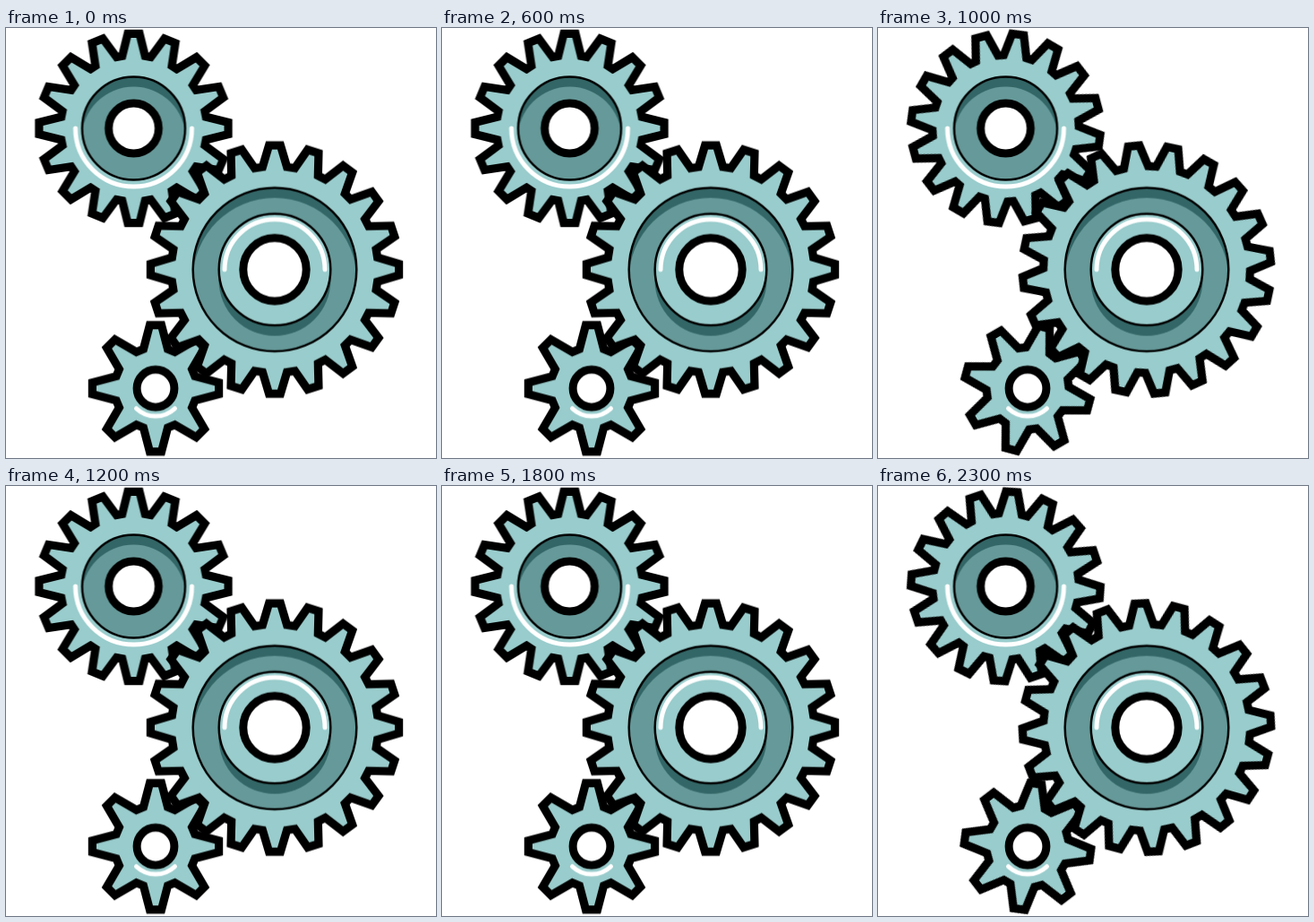
These frames come from a looping animation (480x480 px, 2400 ms). An HTML page:

```html
<!DOCTYPE html>
<html lang="en">
<head>
<meta charset="utf-8">
<title>Gears</title>
<style>
  html, body { margin: 0; width: 100%; height: 100%; overflow: hidden; background: #fff; }
  svg { display: block; width: 100vw; height: 100vh; }
  .teeth {
    fill: #9cc; stroke: #000; stroke-width: 18.4; paint-order: stroke;
    stroke-linejoin: miter; stroke-miterlimit: 6;
    animation: turn 600ms steps(6) infinite;
  }
  .rim { fill: none; stroke: #000; stroke-width: 2.5; }
  .light { fill: #9cc; }
  .mid { fill: #699; }
  .dark { fill: #366; }
  .hub { fill: #fff; stroke: #000; stroke-width: 9; }
  .shine { fill: none; stroke: #fff; stroke-width: 5; stroke-linecap: round; }
  /* each gear advances by exactly one tooth per cycle */
  @keyframes turn { to { transform: rotate(var(--pitch)); } }
</style>
</head>
<body>
<svg viewBox="0 0 480 480">
  <defs>
    <clipPath id="dishA"><circle r="58"/></clipPath>
    <clipPath id="dishB"><circle r="91.5"/></clipPath>
  </defs>

  <g transform="translate(142.5 112)">
    <path class="teeth" data-count="16" data-dir="-1" data-root="76.8" data-tip="101" data-base="9"/>
    <g clip-path="url(#dishA)">
      <circle class="dark" r="58"/>
      <circle class="mid" cy="11.5" r="58"/>
    </g>
    <circle class="rim" r="57.5"/>
    <circle class="hub" r="27.9"/>
    <path class="shine" d="M-65 0A65 65 0 0 0 65 0"/>
  </g>

  <g transform="translate(167 402.3)">
    <path class="teeth" data-count="8" data-dir="-1" data-root="40.5" data-tip="66" data-base="9.7"/>
    <circle class="hub" r="20.9"/>
    <path class="shine" d="M-21.5 22.5A31.2 31.2 0 0 0 21.5 22.5"/>
  </g>

  <g transform="translate(300 269.6)">
    <path class="teeth" data-count="20" data-dir="1" data-root="110.5" data-tip="134" data-base="10"/>
    <g clip-path="url(#dishB)">
      <circle class="dark" r="91.5"/>
      <circle class="mid" cy="11.5" r="91.5"/>
    </g>
    <circle class="rim" r="91.3"/>
    <circle class="dark" cy="11.5" r="62.5"/>
    <circle class="light" r="62.3"/>
    <circle class="rim" r="62.3"/>
    <circle class="hub" r="35.2"/>
    <path class="shine" d="M-56 0A56 56 0 0 1 56 0"/>
  </g>
</svg>
<script>
  const TIP_HALF = 3;

  // Tapered teeth around a circle, the first one pointing up.
  function gearPath(count, root, tip, base) {
    const points = [];
    for (let i = 0; i < count; i++) {
      const a = i * 2 * Math.PI / count;
      const add = (x, r) => points.push([
        (x * Math.cos(a) + r * Math.sin(a)).toFixed(2),
        (x * Math.sin(a) - r * Math.cos(a)).toFixed(2)
      ]);
      add(-base, root);
      add(-TIP_HALF, tip);
      add(TIP_HALF, tip);
      add(base, root);
    }
    return "M" + points.join("L") + "Z";
  }

  for (const el of document.querySelectorAll(".teeth")) {
    const { count, dir, root, tip, base } = el.dataset;
    el.setAttribute("d", gearPath(+count, +root, +tip, +base));
    el.style.setProperty("--pitch", dir * 360 / count + "deg");
  }
</script>
</body>
</html>
```
